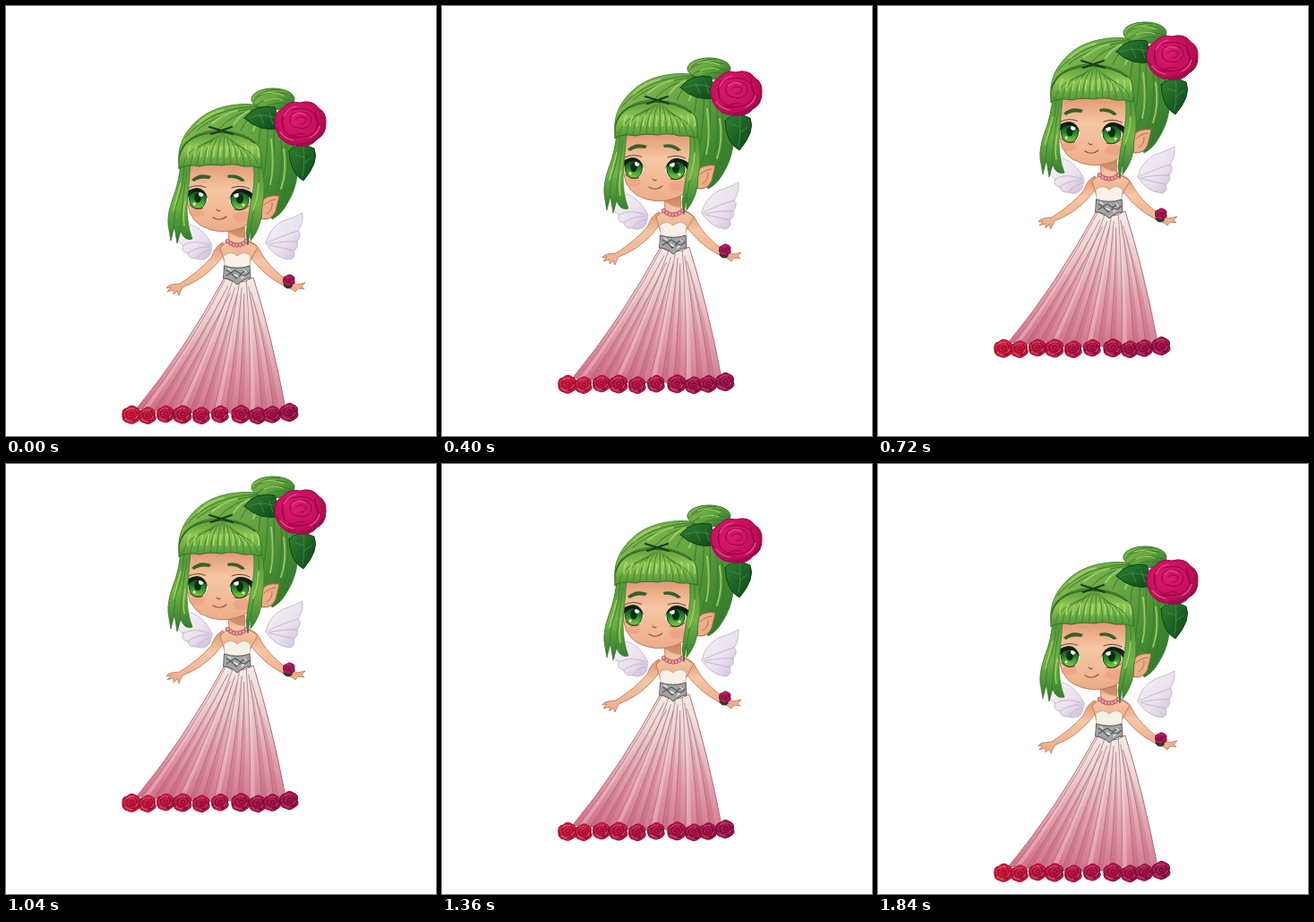
An HTML page for the animation above (1.92 s loop, 480 by 480 pixels).

```html
<!DOCTYPE html>
<html lang="en">
<head>
<meta charset="utf-8">
<title>Floating fairy</title>
<style>
html, body { margin: 0; width: 100%; height: 100%; overflow: hidden; background: #fff; }
svg { display: block; width: 100%; height: 100%; }
path, line { stroke-linecap: round; stroke-linejoin: round; }
.line { fill: none; }
</style>
</head>
<body>
<svg viewBox="0 0 480 480">
<defs>
  <linearGradient id="hair" x1="0" y1="0" x2="1" y2=".7">
    <stop offset="0" stop-color="#86bd50"/><stop offset=".55" stop-color="#64a441"/><stop offset="1" stop-color="#357d2c"/>
  </linearGradient>
  <linearGradient id="bangs" x1="0" y1="0" x2="0" y2="1">
    <stop offset="0" stop-color="#569738"/><stop offset=".45" stop-color="#8fc654"/><stop offset="1" stop-color="#4d9336"/>
  </linearGradient>
  <linearGradient id="lock" x1="0" y1="0" x2="0" y2="1">
    <stop offset="0" stop-color="#4f9637"/><stop offset=".5" stop-color="#72b348"/><stop offset="1" stop-color="#2f7a2b"/>
  </linearGradient>
  <linearGradient id="skin" x1="0" y1="0" x2="0" y2="1">
    <stop offset="0" stop-color="#e0946f"/><stop offset=".4" stop-color="#f6c7a4"/><stop offset="1" stop-color="#edac88"/>
  </linearGradient>
  <linearGradient id="gown" x1=".6" y1="0" x2=".45" y2="1">
    <stop offset="0" stop-color="#f1ebe4"/><stop offset=".25" stop-color="#ecd5d3"/>
    <stop offset=".6" stop-color="#e3a2ae"/><stop offset="1" stop-color="#d2738b"/>
  </linearGradient>
  <linearGradient id="wing" x1="0" y1="0" x2="1" y2="1">
    <stop offset="0" stop-color="#f8f4f8"/><stop offset=".6" stop-color="#e9e0ec"/><stop offset="1" stop-color="#cdb9d8"/>
  </linearGradient>
  <linearGradient id="iris" x1="0" y1="0" x2="0" y2="1">
    <stop offset="0" stop-color="#0d3a14"/><stop offset=".5" stop-color="#23822a"/><stop offset="1" stop-color="#7ed33f"/>
  </linearGradient>
  <radialGradient id="petal" cx=".4" cy=".4" r=".65">
    <stop offset="0" stop-color="#dc1a6c"/><stop offset=".7" stop-color="#c60f5c"/><stop offset="1" stop-color="#970b4a"/>
  </radialGradient>
  <linearGradient id="leaf" x1="0" y1="0" x2="1" y2="1">
    <stop offset="0" stop-color="#2f8230"/><stop offset="1" stop-color="#0d451a"/>
  </linearGradient>
  <g id="eye">
    <path d="M-12 1Q-9-10 2-11Q11-9 11 0Q9 11 0 12Q-9 11-12 1Z" fill="#f6f4ec"/>
    <ellipse rx="10" ry="11.5" fill="url(#iris)" stroke="#123f18"/>
    <ellipse cy="-1" rx="4" ry="5.5" fill="#0b2d10"/>
    <circle cx="-4" cy="-5" r="2.8" fill="#fff"/>
    <circle cx="4" cy="6" r="1.6" fill="#dff7b4"/>
    <path d="M-12 0Q-9-11 2-12Q10-11 15-6L18-8L15-3L18-2L13 1Q8-8 1-8Q-8-7-12 0Z" fill="#101c12"/>
    <path class="line" d="M-6 11Q3 14 10 7M-9-13Q1-17 11-12" stroke="#4d3427" stroke-width=".9"/>
  </g>
</defs>
<g id="fairy">
  <!-- wings -->
  <g fill="url(#wing)" stroke="#b9a6c3" stroke-width=".7">
    <path d="M230 267Q222 250 207 244Q198 246 192 257Q191 264 198 267Q194 274 203 276Q204 283 213 282Q222 286 228 277Z"/>
    <path d="M290 265Q293 249 309 240Q322 236 331 231Q332 242 326 251Q331 255 325 263Q327 270 321 273Q324 282 316 283Q300 281 290 265Z"/>
    <path class="line" d="M198 267Q210 260 227 267M203 276Q213 268 227 269M213 282Q218 274 228 272M326 251Q312 255 292 264M325 263Q311 262 293 266M321 273Q309 270 294 267"/>
  </g>
  <!-- arms and chest -->
  <g fill="url(#skin)" stroke="#b87353" stroke-width=".8">
    <path d="M242 264Q234 267 229 281Q216 296 194 310L185 311Q180 312 179 315L184 314L180 319L187 317L187 322L191 318L193 323L197 314Q219 306 235 288L245 276Z"/>
    <path d="M270 262Q280 264 285 276Q294 292 315 307L325 311L334 309L330 313L333 316L326 315L323 319L319 316Q296 307 281 290L269 276Z"/>
    <path d="M248 244L249 262Q242 266 239 270L244 286H272L281 269Q274 264 267 262L266 244Z"/>
  </g>
  <path d="M248 247H267V259Q255 258 248 251Z" fill="#c87f5d" opacity=".7"/>
  <!-- dress -->
  <path d="M244 303Q258 314 276 303Q297 370 312 449Q230 460 146 449Q199 385 244 303Z" fill="url(#gown)" stroke="#a95d70" stroke-width=".9"/>
  <g id="pleats"/>
  <path d="M243 279Q251 272 258 279Q266 272 273 279L272 292H245Z" fill="#f7f1e7" stroke="#b2a39a" stroke-width=".7"/>
  <path d="M244 290Q258 295 272 290L273 304Q266 304 258 311Q251 304 243 304Z" fill="#a3a4a4" stroke="#555759"/>
  <path class="line" d="M246 295l5 3 5-3 6 4 5-4 4 3M246 301l5-3 6 6 5-4 5 1 4-3" stroke="#55595a" stroke-width="1.2"/>
  <path class="line" d="M248 293l3 2M255 300l4 2M266 295l3 2M263 304l2-2" stroke="#e6e8e7" stroke-width="1.5"/>
  <g id="beads" fill="#e99aa3" stroke="#a23e52" stroke-width=".7"/>
  <g id="hem"/>
  <path d="M309 311Q314 319 320 313L317 308Z" fill="#18491f"/>
  <!-- back hair and bun -->
  <path d="M194 182C189 158 199 139 218 124C236 111 262 107 284 111C303 115 313 130 318 147C329 173 328 199 313 222Q307 233 297 238L284 208V178Z" fill="url(#hair)" stroke="#397a2b" stroke-width=".8"/>
  <ellipse cx="298" cy="104" rx="24" ry="12" fill="url(#hair)" stroke="#34752a"/>
  <path class="line" d="M276 106Q288 92 314 98M279 111Q295 98 318 106M287 114Q302 105 317 110M278 102Q292 91 306 94" stroke="#3b7c2c"/>
  <path class="line" d="M286 98Q297 94 310 100M288 106Q300 101 309 105" stroke="#a5d267"/>
  <g class="line" stroke="#39792c" stroke-width="1">
    <path d="M283 112Q230 112 200 147M285 113Q237 118 213 139M285 114Q253 119 238 137M287 115Q269 122 262 139M289 115Q283 136 282 154M292 116Q294 157 287 194M296 116Q306 165 290 209M300 117Q317 172 298 218M304 122Q325 177 306 224"/>
  </g>
  <g class="line" stroke="#add86f" stroke-width="2" opacity=".75">
    <path d="M214 132Q227 119 243 116M230 131Q243 120 258 117M254 132Q263 120 272 117M276 139Q280 129 283 123M296 149Q300 178 295 199M310 160Q314 184 307 204"/>
  </g>
  <!-- ear and face -->
  <path d="M284 219Q291 210 305 212Q303 221 301 229Q297 239 286 238Z" fill="#edaf89" stroke="#a96345"/>
  <path class="line" d="M288 222Q295 216 301 216M291 232Q298 228 297 220" stroke="#b76d50"/>
  <path d="M202 174H285L283 222Q278 242 262 248Q239 257 217 245Q202 235 202 212Z" fill="url(#skin)" stroke="#ae6f50" stroke-width=".8"/>
  <g fill="#e8866c" opacity=".32"><ellipse cx="213" cy="231" rx="9" ry="5"/><ellipse cx="264" cy="235" rx="11" ry="6"/></g>
  <use href="#eye" transform="translate(214 215) scale(-.95 .98)"/>
  <use href="#eye" transform="translate(261 216)"/>
  <path d="M207 194Q216 185 229 190L227 193Q216 191 210 196ZM247 189Q259 186 267 195L263 196Q256 191 248 192Z" fill="#37612a"/>
  <path class="line" d="M235 227Q237 230 239 228M231 236Q239 241 246 235" stroke="#934c38" stroke-width="1.1"/>
  <!-- side locks and bangs -->
  <g fill="url(#lock)" stroke="#397a2b" stroke-width=".8">
    <path d="M195 173Q194 195 186 215Q180 232 181 244L184 262L188 246L191 265L195 251Q199 263 208 260Q202 245 202 224L206 176Z"/>
    <path d="M276 174Q279 198 273 220Q270 239 268 253L270 267L273 247L273 262Q286 246 286 224Q291 203 285 174Z"/>
    <path class="line" d="M199 180Q197 207 189 225L187 249M202 184Q196 221 194 252M282 180Q284 208 276 231L272 253"/>
  </g>
  <path class="line" d="M195 198Q190 217 187 228M200 218Q197 233 199 245M282 198Q281 216 276 228" stroke="#a1d061" stroke-width="1.5"/>
  <path d="M193 181Q191 157 206 148Q220 138 241 139Q272 142 282 156Q286 166 285 181Q275 178 265 179Q252 175 241 178Q226 176 216 179Q203 176 193 181Z" fill="url(#bangs)" stroke="#34702a"/>
  <g id="fringe" class="line"/>
  <path class="line" d="M194 166Q200 146 226 142Q257 138 278 153" stroke="#326b25" stroke-width="1.6"/>
  <path class="line" d="M227 135L253 143M229 143L252 135" stroke="#193a1a" stroke-width="2"/>
  <!-- hair ornament -->
  <g fill="url(#leaf)" stroke="#0d421b">
    <path d="M266 125Q278 109 300 113L307 136Q284 142 266 125Z"/>
    <path d="M316 162Q326 150 344 159Q350 174 332 195Q317 187 316 162Z"/>
    <path class="line" d="M271 125Q289 118 305 127M283 120l5 12M294 119l4 13M332 155Q334 175 331 190M332 169l-9-3M333 175l8-6" stroke="#449047" stroke-width=".8"/>
  </g>
  <path d="M300 130Q299 119 309 114Q316 105 328 108Q342 104 349 114Q358 119 357 131Q357 144 347 149Q340 158 326 156Q315 156 308 149Q301 143 300 130Z" fill="url(#petal)" stroke="#970d49"/>
  <g class="line" stroke="#8e0942" stroke-width="1">
    <path d="M308 130Q307 115 323 115Q340 112 347 124Q352 138 338 145Q321 150 311 140Z"/>
    <path d="M317 128Q316 119 328 119Q342 118 341 129Q337 139 326 136Q317 135 317 128ZM323 127Q328 121 335 126Q335 132 328 132M302 137Q311 149 327 147M327 154Q343 155 355 139M311 118Q307 127 310 136M345 116Q344 132 352 134M315 151Q322 140 333 143"/>
  </g>
  <path class="line" d="M310 123Q314 114 324 112M320 123Q326 117 334 121M306 141Q313 149 321 150M339 147Q348 143 350 134" stroke="#ee4b8b" stroke-width="1.2"/>
</g>
</svg>
<script>
const $ = id => document.getElementById(id);

function add(parent, tag, attrs) {
  const el = document.createElementNS("http://www.w3.org/2000/svg", tag);
  for (const key in attrs) el.setAttribute(key, attrs[key]);
  parent.append(el);
  return el;
}

function smallRose(parent, x, y, r, hue, light) {
  const g = add(parent, "g", { transform: `translate(${x} ${y}) scale(${r / 10})` });
  const dark = `hsl(${hue} 82% ${light - 15}%)`;
  add(g, "path", {
    d: "M-10 0Q-11-6-5-7Q0-12 5-8Q11-6 9 0Q12 5 6 8Q1 12-4 9Q-11 8-10 0Z",
    fill: `hsl(${hue} 75% ${light}%)`, stroke: dark
  });
  add(g, "path", {
    d: "M-6-1Q-5-7 2-6Q8-4 5 2Q0 6-5 3ZM-2 0Q0-4 3-1Q2 3-2 1M-9 2Q-4 9 4 6M8-2Q9 4 3 8M-7-5L-4-3",
    fill: "none", stroke: dark, "stroke-width": 1.3
  });
  add(g, "path", {
    d: "M-6-4Q-2-8 3-6M-7 4Q-4 8 0 7M5 4L7 1",
    fill: "none", stroke: `hsl(${hue} 78% ${light + 17}%)`, "stroke-width": 1.1
  });
}

// Curve down the skirt at a fraction u of its width.
function fold(u) {
  return {
    x0: 244 + 32 * u, y0: 304 + 16 * u * (1 - u),
    cx: 199 + 98 * u, cy: 385 - 15 * u,
    x1: 146 + 166 * u, y1: 449 + 12 * u * (1 - u)
  };
}
for (let i = 0; i < 12; i++) {
  const a = fold((i + .5) / 12.5), b = fold((i + .95) / 12.5);
  const edge = `M${a.x0} ${a.y0 + i % 3 * 7}Q${a.cx} ${a.cy} ${a.x1} ${a.y1}`;
  add($("pleats"), "path", {
    d: `${edge}L${b.x1} ${b.y1}Q${b.cx} ${b.cy} ${a.x0} ${a.y0 + i % 3 * 7}Z`,
    fill: i % 3 ? "#a94e6d" : "#fff0df", opacity: i % 3 ? .25 : .3
  });
  add($("pleats"), "path", { d: edge, fill: "none", stroke: "#a9596e", "stroke-width": .9, opacity: .7 });
}

for (let i = 0; i < 7; i++) {
  const u = i / 3 - 1;
  add($("beads"), "circle", { cx: 258 + 10.5 * u, cy: 267 - 4.5 * u * u, r: 2.3 });
}

[140, 158, 178, 197, 218, 239, 262, 281, 297, 316].forEach((x, i) =>
  smallRose($("hem"), x, 456 + Math.sin(i * 2) - (i > 8 ? 2 : 0), i % 3 ? 9.3 : 10, 348 - i * 1.4, 47 - i));
smallRose($("fairy"), 316, 306, 6.5, 333, 39);

for (let i = 0; i < 12; i++) {
  const u = i / 11, x = 198 + 83 * u, top = 144 + 34 * (u - .45) ** 2;
  add($("fringe"), "path", {
    d: `M${230 + 25 * u} ${top}Q${x + 3 - 6 * u} ${top + 8} ${x} 177`,
    stroke: "#3e812e", "stroke-width": .9
  });
  add($("fringe"), "path", {
    d: `M${x + 5 - 4 * u} 168Q${x + 5 - 3 * u} 161 ${x + 8 - 8 * u} ${156 + i % 3}`,
    stroke: "#b9df77", "stroke-width": 1.8, opacity: .7
  });
}

// Twelve eased steps up, the same twelve back down; each end is held twice.
const STEP = 80, COUNT = 24, RISE = 80;
function draw(now) {
  const i = Math.floor(now / STEP) % COUNT;
  const k = Math.min(i, COUNT - 1 - i);
  const lift = Math.round(RISE / 2 * (1 - Math.cos(Math.PI * k / 11)));
  $("fairy").setAttribute("transform", `translate(0 ${-lift})`);
  requestAnimationFrame(draw);
}
draw(0);
</script>
</body>
</html>
```
